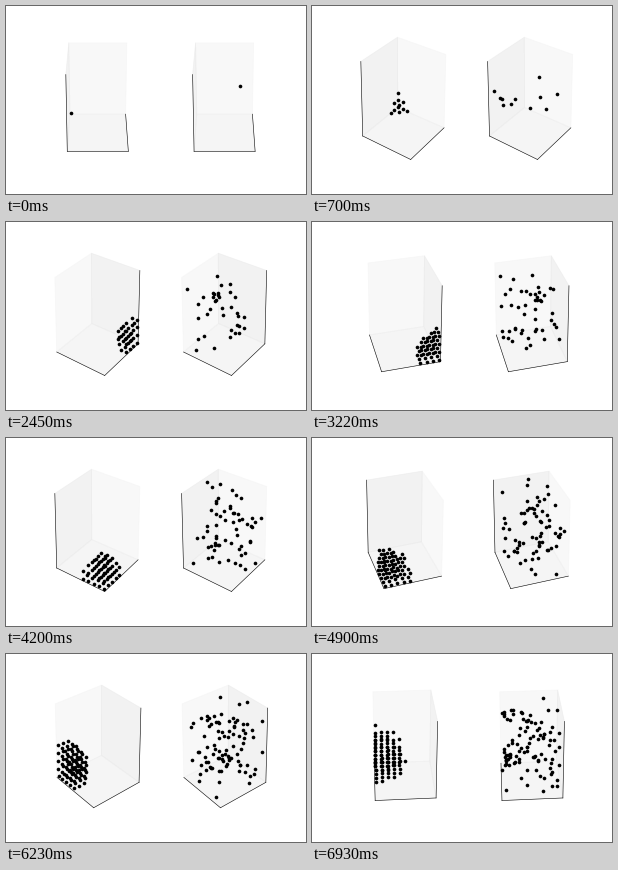
Write a matplotlib script that moves like this. It is 300 px wide and 188 px high and loops after 7000 ms.

```python
from itertools import product

import matplotlib.pyplot as plt
import numpy as np
from matplotlib.animation import FuncAnimation

W, H, DPI = 300, 188, 100
COUNT = 100
ELEV = np.radians(25)
DIST = 10
SCALE_X, SCALE_Y = 571.4, 782.7
CENTERS = [(91.8, 89.7), (218.6, 89.7)]
LO, HI = -1 / 48, 49 / 48  # the box reaches slightly past the unit cube
GREYS = ["0.95", "0.90", "0.925"]


def lattice_points():
    """Lattice nodes ordered by their distance from the origin."""
    nodes = sorted(product(range(10), repeat=3),
                   key=lambda p: sum(c * c for c in p))
    return np.array([p[::-1] for p in nodes[:COUNT]]) / 9


def random_points():
    return np.random.RandomState(7).rand(COUNT, 3)


def project(points, azim, center):
    """Perspective view of the unit cube, in pixels."""
    x, y, z = (np.asarray(points, float) - 0.5).T
    side = -np.sin(azim) * x + np.cos(azim) * y
    near = np.cos(azim) * x + np.sin(azim) * y
    up = np.cos(ELEV) * z - np.sin(ELEV) * near
    depth = DIST - np.cos(ELEV) * near - np.sin(ELEV) * z
    return np.column_stack([center[0] + SCALE_X * side / depth,
                            center[1] - SCALE_Y * up / depth])


def pane_corners(axis, back):
    """Corners of the back face at right angles to an axis."""
    a, b = [i for i in range(3) if i != axis]
    corners = np.full((4, 3), back[axis])
    corners[:, a] = [LO, HI, HI, LO]
    corners[:, b] = [LO, LO, HI, HI]
    return corners


def axis_ends(axis, back):
    """Ends of the axis line that runs along the given direction."""
    flip = 1 if axis == 0 else 0
    ends = np.array([back, back])
    ends[:, flip] = 1 - back[flip]
    ends[:, axis] = [LO, HI]
    return ends


class Box:
    def __init__(self, ax, points, center):
        self.points, self.center = points, center
        self.panes = [
            ax.add_patch(plt.Polygon(np.zeros((4, 2)), color=grey, alpha=0.5,
                                     lw=0.5, snap=False))
            for grey in GREYS]
        self.lines = [ax.plot([], [], color="black", lw=0.4, snap=False,
                              zorder=2)[0] for _ in range(3)]
        self.dots = ax.scatter([], [], s=6.9, c="black", linewidths=0,
                               zorder=3)

    def update(self, shown, azim):
        back = np.array([HI if np.cos(azim) < 0 else LO,
                         HI if np.sin(azim) < 0 else LO, LO])
        for axis in range(3):
            corners = pane_corners(axis, back)
            self.panes[axis].set_xy(project(corners, azim, self.center))
            ends = project(axis_ends(axis, back), azim, self.center)
            self.lines[axis].set_data(ends[:, 0], ends[:, 1])
        self.dots.set_offsets(project(self.points[:shown], azim, self.center))
        return [*self.panes, *self.lines, self.dots]


fig = plt.figure(figsize=(W / DPI, H / DPI), dpi=DPI, facecolor="white")
ax = fig.add_axes([0, 0, 1, 1])
ax.set_xlim(0, W)
ax.set_ylim(H, 0)
ax.axis("off")
ax.set_autoscale_on(False)

boxes = [Box(ax, points, center) for points, center
         in zip([lattice_points(), random_points()], CENTERS)]


def draw(i):
    azim = 2 * np.pi * i / COUNT
    return [artist for box in boxes for artist in box.update(i + 1, azim)]


anim = FuncAnimation(fig, draw, frames=COUNT, interval=70, repeat=True)
plt.show()
```
